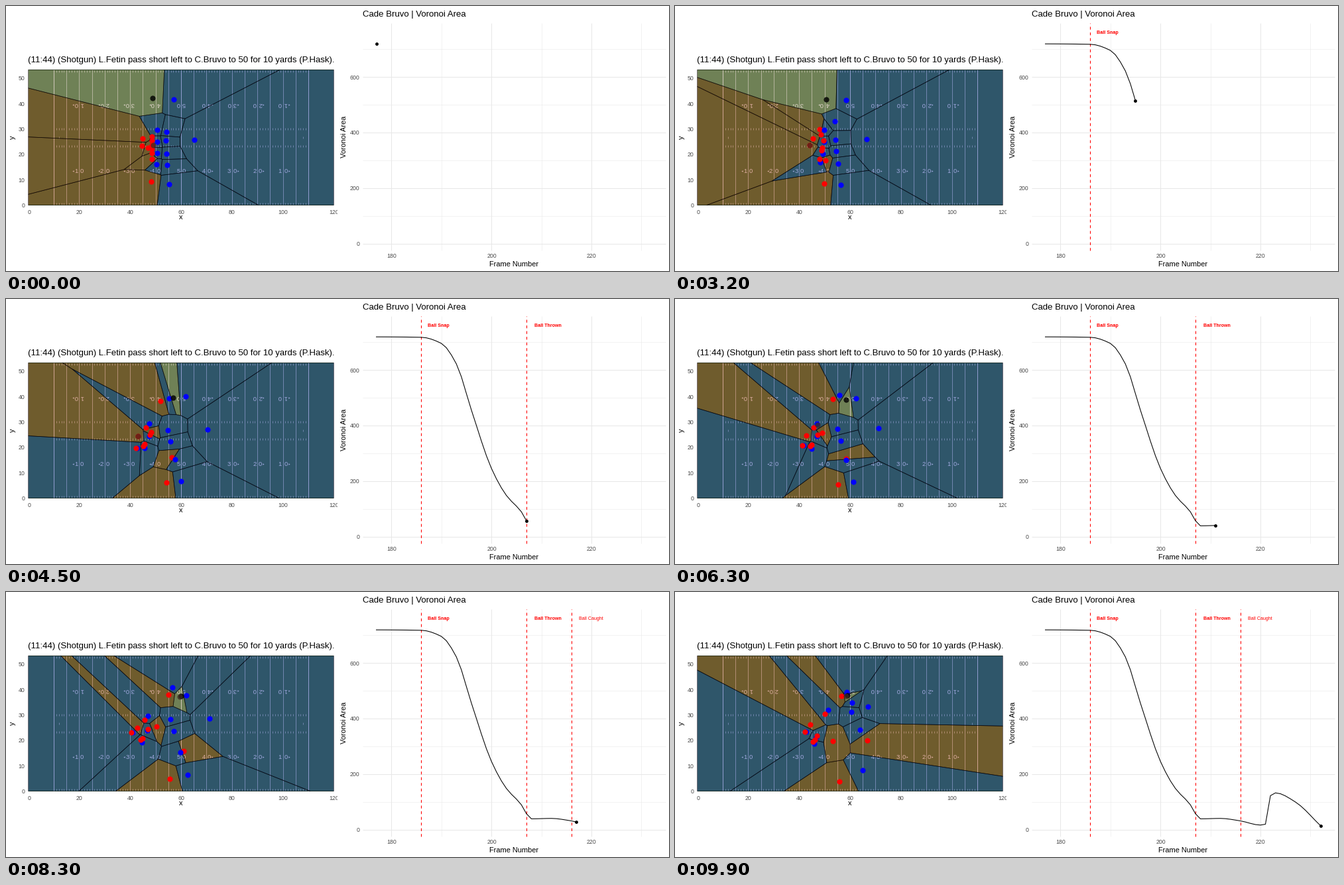
Write a matplotlib script that moves like this. It is 1000x400 px and loops after 10000 ms.

```python
import numpy as np
import matplotlib.pyplot as plt
from matplotlib.animation import FuncAnimation
from matplotlib.collections import LineCollection, PolyCollection
from matplotlib.patches import Rectangle

PX = 0.72  # points per pixel at 100 dpi
plt.rcParams["font.family"] = "Liberation Sans"

FIRST, SNAP, THROW, CATCH, LAST = 177, 186, 207, 216, 232
TOP, BOTTOM = 96.3, 300.6
LEFT, RIGHT = 33.6, 494.4
FIELD = (64 / 255, 115 / 255, 57 / 255)
TINT = {"red": (1, .1, .05, .25), "blue": (0, 0, 1, .25), "black": (1, .68, .68, .25)}
DOT = {"red": "#ff0000", "blue": "#0000ff", "black": (0, 0, 0, .82)}

# Players glide through a few waypoints (pixels): set, mid-play, end.
MOVE_T = (187, 214, LAST)
MOVES = {
    "tight end": [(220, 231), (263, 241), (290, 223.5)],
    "wideout": [(219, 265), (247, 281.5), (248, 286)],
    "back": [(205.5, 200), (224.5, 202), (238, 224.5)],
    "passer": [(205, 211), (197.5, 205.5), (204, 199.5)],
    "left end": [(228, 187), (213, 188), (231, 177.5)],
    "left tackle": [(228, 205), (213, 208), (212.5, 218.5)],
    "right tackle": [(228, 222), (205, 226.5), (210, 229)],
    "nickel": [(240, 182.5), (249.5, 144), (259, 151)],
    "left backer": [(241, 202.5), (246.5, 194.5), (267, 166.5)],
    "mid backer": [(242, 219.5), (251.5, 212.5), (266, 181)],
    "right backer": [(243.5, 237), (260.5, 243.5), (279, 207.5)],
    "right corner": [(246, 268.5), (271.5, 276), (283, 269)],
    "safety": [(284, 201.5), (308, 193.5), (291, 173)],
}
# Sharper cuts need more waypoints.
CUT_T = (187, 211, 217, 224, LAST)
CUTS = {
    "slot": [(213, 198), (238, 150.5), (244.5, 154.5), (249.5, 160.5), (251, 157)],
    "right end": [(227, 238.5), (193.5, 220.5), (191, 211.5), (194, 208.5), (198, 211)],
    "corner": [(252.5, 140.5), (272.5, 149.5), (272, 155.5), (262, 159.5), (259.2, 154.2)],
    "receiver": [(221, 139), (258, 151.5), (264, 157), (263.3, 157.7), (260, 156.2)],
}
# Where players in motion stand before the snap, relative to their set point.
MOTION = {"slot": (.5, 15.5), "nickel": (2, 7.5), "mid backer": (0, 3.5),
          "right backer": (-1, 3)}
OFFENSE = ["tight end", "wideout", "back", "passer", "slot"]
DEFENSE = [n for n in [*MOVES, *CUTS] if n not in OFFENSE + ["receiver"]]
NAMES = OFFENSE + DEFENSE + ["receiver"]
TEAMS = ["red"] * len(OFFENSE) + ["blue"] * len(DEFENSE) + ["black"]

# Each blocker engages a rusher, keeping a fixed offset.
BLOCKS = [("left end", (-5, 6)), ("left tackle", (1, -2)), ("right tackle", (.5, -6)),
          ("right tackle", (-2, -3.5)), ("right end", (-2, 0))]
LINE_UP = np.column_stack([np.full(5, 220), np.linspace(197, 222, 5)])
BALL_SPOT = np.array([222, 210])

# Key points of the area curve.
AREA_T, AREA = zip((177, 719.5), (186, 718), (190, 696), (193, 622), (196, 456), (200, 246),
                   (203, 148), (206, 89), (207, 57), (208, 38.5), (212, 40), (216, 31),
                   (220, 16), (221, 19), (222, 122), (223, 132), (227, 99), (232, 14))

# The clock halts at the snap, the throw and the catch.
CLOCK_I = [0, 9, 23, 45, 59, 69, 82, 99]
CLOCK_T = [FIRST, SNAP, SNAP, THROW, THROW, CATCH, CATCH, LAST]


def glide(t, keys, values):
    """Monotone cubic through the key values, starting from rest."""
    keys, v = np.array(keys, float), np.array(values, float).reshape(len(keys), -1)
    step = np.diff(keys)
    rate = np.diff(v, axis=0) / step[:, None]
    a, b = rate[:-1], rate[1:]
    same = a * b > 0
    inner = np.where(same, 2 * a * b / np.where(same, a + b, 1), 0)
    slope = np.vstack([0 * rate[:1], inner, rate[-1:]])
    k = int(np.clip(np.searchsorted(keys, t, "right") - 1, 0, len(step) - 1))
    s = np.clip((t - keys[k]) / step[k], 0, 1)
    return (v[k] + (v[k + 1] - v[k]) * smooth(s)
            + step[k] * s * (1 - s) * ((1 - s) * slope[k] - s * slope[k + 1]))


def smooth(s):
    s = np.clip(s, 0, 1)
    return s * s * (3 - 2 * s)


def place(t):
    """Position of every skill player and defender."""
    spots = {n: glide(t, MOVE_T, p) for n, p in MOVES.items()}
    spots.update({n: glide(t, CUT_T, p) for n, p in CUTS.items()})
    wait = max(0, (187 - t) / (187 - FIRST))
    for name, offset in MOTION.items():
        spots[name] = spots[name] + wait * np.array(offset)
    return spots


def place_line(t, spots):
    engaged = np.array([spots[n] + offset for n, offset in BLOCKS])
    return LINE_UP + (engaged - LINE_UP) * smooth((t - 187) / 13)


def place_ball(t, spots):
    hand = spots["passer"]
    if t < THROW:
        return BALL_SPOT + (hand - BALL_SPOT) * smooth((t - SNAP) / 5)
    catch = spots["receiver"] + (-2, .5)
    return hand + (catch - hand) * min(1, (t - THROW) / (CATCH - THROW)) ** 1.5


def clip(poly, mx, my, nx, ny):
    """Keep the part of poly on the inner side of the line through m."""
    out = []
    px, py = poly[-1]
    pd = (px - mx) * nx + (py - my) * ny
    for x, y in poly:
        d = (x - mx) * nx + (y - my) * ny
        if (d > 0) != (pd > 0):
            f = pd / (pd - d)
            out.append((px + f * (x - px), py + f * (y - py)))
        if d <= 0:
            out.append((x, y))
        px, py, pd = x, y, d
    return out


def voronoi(points):
    box = [(LEFT, TOP), (RIGHT, TOP), (RIGHT, BOTTOM), (LEFT, BOTTOM)]
    cells = []
    pts = points.tolist()
    for i, (x, y) in enumerate(pts):
        cell = box
        for j, (u, v) in enumerate(pts):
            if i != j and cell:
                cell = clip(cell, (x + u) / 2, (y + v) / 2, u - x, v - y)
        cells.append(cell or [(x, y)] * 3)
    return cells


def field_x(yard):
    return LEFT + 3.84 * yard


def field_y(yard):
    return BOTTOM - 3.834 * yard


def chart_x(sample):
    return 581.2 + 7.545 * (sample - 180)


def chart_y(area):
    return 358.5 - .4188 * area


def pixel_axes(x0, x1):
    ax = fig.add_axes([x0 / 1000, 0, (x1 - x0) / 1000, 1])
    ax.set_xlim(x0, x1)
    ax.set_ylim(400, 0)
    ax.axis("off")
    return ax


def label(ax, x, y, text, size, ha="center", va="center", **style):
    return ax.text(x, y, text, fontsize=size * PX, ha=ha, va=va, clip_on=True, **style)


def tick(ax, x, y, value, ha="center"):
    label(ax, x, y, str(value), 8.8, ha, "center_baseline", color="#4d4d4d")


def lines(ax, segments, width, color):
    ax.add_collection(LineCollection(segments, linewidths=width * PX, colors=[color], zorder=1))


def draw_field(ax):
    ax.add_patch(Rectangle((LEFT, TOP), RIGHT - LEFT, BOTTOM - TOP, fc=FIELD, ec="none"))
    white = (1, 1, 1, .55)
    for width, yards in ((.85, range(10, 111, 5)), (.7, (10, 60, 110))):
        lines(ax, [[(field_x(x), TOP), (field_x(x), BOTTOM)] for x in yards], width, white)
    marks = [[(field_x(x), y), (field_x(x), y + 2.8)]
             for x in range(11, 110) if x % 5
             for y in (TOP + 1, 184.2, 210.2, BOTTOM - 3.6)]
    marks += [[(field_x(x), 196.5), (field_x(x), 200)] for x in (12, 108)]
    lines(ax, marks, .8, white)
    for x in range(20, 101, 10):
        tens = str(min(x - 10, 110 - x) // 10)
        cx, side = field_x(x), np.sign(x - 60)
        for y, turn, pair in ((250, 0, tens + "0"), (148, 180, "0" + tens)):
            for dx, digit in zip((-4.2, 4.2), pair):
                label(ax, cx + dx, y, digit, 9.5, color=(1, 1, 1, .78), rotation=turn)
            if side:
                ax.plot(cx + side * 9, y + (1 if turn else -1), "<" if side < 0 else ">",
                        ms=2.4 * PX, color=(1, 1, 1, .78), mew=0)
    label(ax, 33.3, 85, "(11:44) (Shotgun) L.Fetin pass short left to C.Bruvo to 50 "
          "for 10 yards (P.Hask).", 13.2, "left", "baseline")
    for x in range(0, 121, 20):
        tick(ax, field_x(x) + (0 if x else 1.5), 310, x)
    for y in range(0, 51, 10):
        tick(ax, 28.5, field_y(y), y, "right")
    label(ax, 264, 319.5, "x", 11)
    label(ax, 9.5, 198.5, "y", 11, rotation=90)


def draw_chart(ax):
    x0, x1, y0, y1 = 538, 994.5, 26, 369
    for width, xs, ys in ((.55, (190, 210, 230), (100, 300, 500, 700)),
                          (1.07, (180, 200, 220), (0, 200, 400, 600))):
        grid = [[(chart_x(x), y0), (chart_x(x), y1)] for x in xs]
        grid += [[(x0, chart_y(y)), (x1, chart_y(y))] for y in ys]
        lines(ax, grid, width, "#e8e8e8")
    for x in (180, 200, 220):
        tick(ax, chart_x(x) + .4, 377, x)
    for y in (0, 200, 400, 600):
        tick(ax, 533.2, chart_y(y), y, "right")
    label(ax, 538, 16, "Cade Bruvo | Voronoi Area", 13.2, "left", "baseline")
    label(ax, 766.3, 393, "Frame Number", 11, va="baseline")
    label(ax, 510, 197.5, "Voronoi Area", 11, rotation=90)


def add_event(ax, sample, x, text, weight="bold"):
    rule, = ax.plot([chart_x(sample)] * 2, [369, 26], color="red", lw=1.07 * PX,
                    dashes=(4, 4), zorder=3, dash_capstyle="butt")
    name = label(ax, x, 42.3, text, 7.16, "left", "baseline", color="red", weight=weight)
    return sample, rule, name


fig = plt.figure(figsize=(10, 4), dpi=100, facecolor="white")
left, right = pixel_axes(0, 500), pixel_axes(500, 1000)
draw_field(left)
draw_chart(right)

cells = PolyCollection([], facecolors=[TINT[t] for t in TEAMS],
                       edgecolors=[(0, 0, 0, .7)], linewidths=.75 * PX, zorder=4)
left.add_collection(cells)


def add_dots(color, z, **style):
    return left.plot([], [], "o", ms=8.2 * PX, mew=0, color=color, zorder=z, **style)[0]


offense, defense = add_dots(DOT["red"], 5), add_dots(DOT["blue"], 6)
blockers, receiver = add_dots(DOT["red"], 7), add_dots(DOT["black"], 8)
ball = add_dots("#3d2b1f", 9, alpha=.75)

samples = np.arange(FIRST, LAST + 1)
curve_x = chart_x(samples)
curve_y = chart_y(np.array([glide(t, AREA_T, AREA)[0] for t in samples]))
curve, = right.plot([], [], "k-", lw=1.07 * PX, zorder=4)
tip, = right.plot([], [], "ko", ms=4.9 * PX, mew=0, zorder=5)
events = [add_event(right, SNAP, 636.5, "Ball Snap"),
          add_event(right, THROW, 797.3, "Ball Thrown"),
          add_event(right, CATCH, 863.8, "Ball Caught", "normal")]


def update(i):
    t = int(np.round(np.interp(i, CLOCK_I, CLOCK_T)))
    spots = place(t)
    cells.set_verts(voronoi(np.array([spots[n] for n in NAMES])))
    offense.set_data(*np.transpose([spots[n] for n in OFFENSE]))
    defense.set_data(*np.transpose([spots[n] for n in DEFENSE]))
    blockers.set_data(*place_line(t, spots).T)
    receiver.set_data(*spots["receiver"][:, None])
    ball.set_data(*place_ball(t, spots)[:, None])

    n = t - FIRST + 1
    curve.set_data(curve_x[:n], curve_y[:n])
    tip.set_data(curve_x[n - 1:n], curve_y[n - 1:n])
    for sample, rule, name in events:
        rule.set_visible(t >= sample)
        name.set_visible(t >= sample)
    return cells, offense, defense, blockers, receiver, ball, curve, tip


anim = FuncAnimation(fig, update, frames=100, interval=100, repeat=True, blit=False)
plt.show()
```
